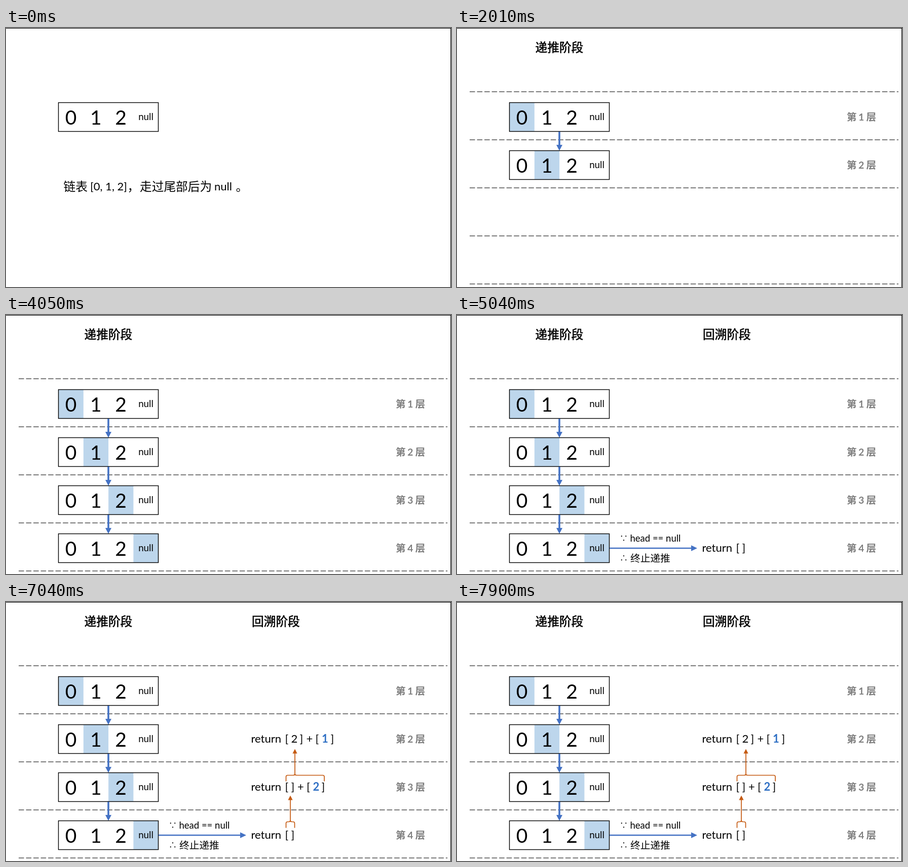
An HTML page that plays this animation: 878 by 512 pixels, repeating every 8 s.

```html
<!DOCTYPE html>
<html lang="zh-CN">
<head>
<meta charset="utf-8">
<title>链表递归</title>
<style>
html, body { margin: 0; width: 100%; height: 100%; overflow: hidden; background: #fff; }
svg { display: block; width: 878px; height: 512px; }
text { font: 22px Lato, sans-serif; fill: #000; }
.zh { font-family: "Noto Sans CJK SC", "Noto Sans CJK", sans-serif; }
.title { font-size: 23.7px; stroke: #000; stroke-width: .6px; }
.body { font-size: 23.7px; font-weight: 300; }
.note { font-size: 19.7px; font-weight: 300; }
.sign { font-size: 16px; text-anchor: middle; }
.digit { font-size: 39px; text-anchor: middle; }
.null { font-size: 18.7px; text-anchor: middle; }
.code { font-size: 18.5px; }
.level { font-size: 19.5px; font-weight: 700; fill: #7f7f7f; text-anchor: middle; }
.added { font-weight: 700; fill: #2e6fc4; }
.box { fill: none; stroke: #000; stroke-width: 1.4px; }
.cell { fill: #bdd6ec; }
.rule { stroke: #505050; stroke-width: 1.6px; stroke-dasharray: 10.57 3.96; }
.call { fill: #4472c4; }
.brace { fill: none; stroke: #c55a11; stroke-width: 1.7px; }
.tip { fill: #c55a11; }
.hand { fill: #fff; stroke: #000; stroke-width: 1.1px; stroke-linejoin: round; }
</style>
</head>
<body>
<svg id="stage" viewBox="0 0 878 512"></svg>
<script>
const LOOP = 8000;
const ROW = 95;
const CELL = 49.3;
const LEFT = 103.5;
const rowTimes = [1020, 2010, 3030, 4010];
const scenes = [];

const text = (x, y, cls, str) => `<text x="${x}" y="${y}" class="${cls}">${str}</text>`;
const path = (cls, d) => `<path class="${cls}" d="${d}"/>`;
const scene = (start, end, markup) => scenes.push({ start, end, markup });

function listBox(row) {
  const y = 147.5 + ROW * row;
  const digits = [0, 1, 2].map(n => text(128 + CELL * n, y + 43.3, "digit", n)).join("");
  return `<rect class="box" x="${LEFT}" y="${y}" width="197" height="57"/>`
    + digits + text(276, y + 34.5, "null", "null");
}

function highlight(row) {
  return `<rect class="cell" x="${LEFT + CELL * row}" y="${147.5 + ROW * row}" width="${CELL}" height="57"/>`;
}

function level(row) {
  const y = 183.3 + ROW * row;
  return text(778.7, y, "zh level", "第") + text(797.7, y - .3, "level", row + 1)
    + text(817.3, y, "zh level", "层");
}

function callArrow(row) {
  const y = 110 + ROW * row;
  return path("call", `M200.2 ${y}h3.6v26h4.2l-6 11.5-6-11.5h4.2z`);
}

// Brace over a returned list, with an arrow up to the next level.
function returnArrow(left, right, mid, top) {
  const tip = top - 52;
  return path("brace", `M${left} ${top + 12}v-9q0-3 3-3H${mid - 3}q3 0 3-3V${tip + 6}`
      + `M${mid} ${top - 3}q0 3 3 3H${right - 3}q3 0 3 3v9`)
    + path("tip", `M${mid} ${tip}l4.6 9h-9.2z`);
}

function returnLine(row, tokens) {
  const y = 183.3 + ROW * row;
  return text(483.5, y, "", "return")
    + tokens.map(([x, str, cls = ""]) => text(x, y, cls, str)).join("");
}

scene(0, 1020,
  text(113.5, 322, "zh body", "链表") + text(166, 321, "", "[0, 1, 2]")
  + text(239.5, 322, "zh body", "，") + text(264, 322, "zh body", "走过尾部后为")
  + text(411, 321, "", "null") + text(453.5, 322, "zh body", "。"));

const rules = [0, 1, 2, 3, 4]
  .map(n => path("rule", `M25 ${126 + ROW * n}H871`)).join("");
scene(1020, LOOP, rules + text(154.5, 46.5, "zh title", "递推阶段"));

rowTimes.forEach((start, row) => {
  scene(start, LOOP, highlight(row) + (row ? callArrow(row) : "") + level(row));
  scene(row ? start : 0, LOOP, listBox(row));
});

scene(5040, LOOP,
  text(485, 46.5, "zh title", "回溯阶段")
  + path("call", "M301 459.7H462v-4.4l12 5.7-12 5.7v-4.4H301z")
  + text(329, 447, "zh sign", "∵") + text(341.5, 448, "code", "head == null")
  + text(329, 486, "zh sign", "∴") + text(342, 488, "zh note", "终止递推")
  + returnLine(3, [[550.5, "["], [562.5, "]"]]));

scene(6020, LOOP,
  returnArrow(552.5, 569.5, 561, 434.5)
  + returnLine(2, [[550.5, "["], [562.5, "]"], [575, "+"], [593, "["],
    [605.5, "2", "added"], [622.5, "]"]]));

scene(7040, LOOP,
  returnArrow(552.5, 628, 570, 342.5)
  + returnLine(1, [[550.5, "["], [562.5, "2"], [579.5, "]"], [592.5, "+"], [610.5, "["],
    [623, "1", "added"], [640.5, "]"]]));

const hand = path("hand", "M5 14V2.5a1.7 1.7 0 0 1 3.4 0V9q0-1.5 1.6-1.5t1.6 1.8q0-1.2 1.5-1.2"
  + "t1.5 1.8q0-1 1.2-1t1.2 1.6V16q0 3-2 5v2.5H7V22Q5 19 1 14.5q-1-2 1-2.3Q4 12.5 5 14z");
scene(7200, 7820, `<g id="pointer">${hand}</g>`);

// time, x, y
const pointerSteps = [[7200, 545, 512], [7380, 513, 321], [7460, 513, 321], [7820, 545, 514]];

function pointerAt(t) {
  const i = Math.max(1, pointerSteps.findIndex(step => step[0] >= t));
  const [t0, x0, y0] = pointerSteps[i - 1];
  const [t1, x1, y1] = pointerSteps[i];
  const p = (t - t0) / (t1 - t0);
  const k = p * p * (3 - 2 * p);
  return [x0 + (x1 - x0) * k, y0 + (y1 - y0) * k];
}

const stage = document.getElementById("stage");
stage.innerHTML = scenes.map(s => `<g>${s.markup}</g>`).join("")
  + '<path d="M0 0H878V512H877V1H0z"/>';
const groups = [...stage.children];
const pointer = document.getElementById("pointer");

function draw() {
  const t = performance.now() % LOOP;
  scenes.forEach(({ start, end }, i) => {
    groups[i].style.display = t >= start && t < end ? "" : "none";
  });
  if (t >= 7200 && t < 7820) pointer.setAttribute("transform", `translate(${pointerAt(t)})`);
  requestAnimationFrame(draw);
}
draw();
</script>
</body>
</html>
```
